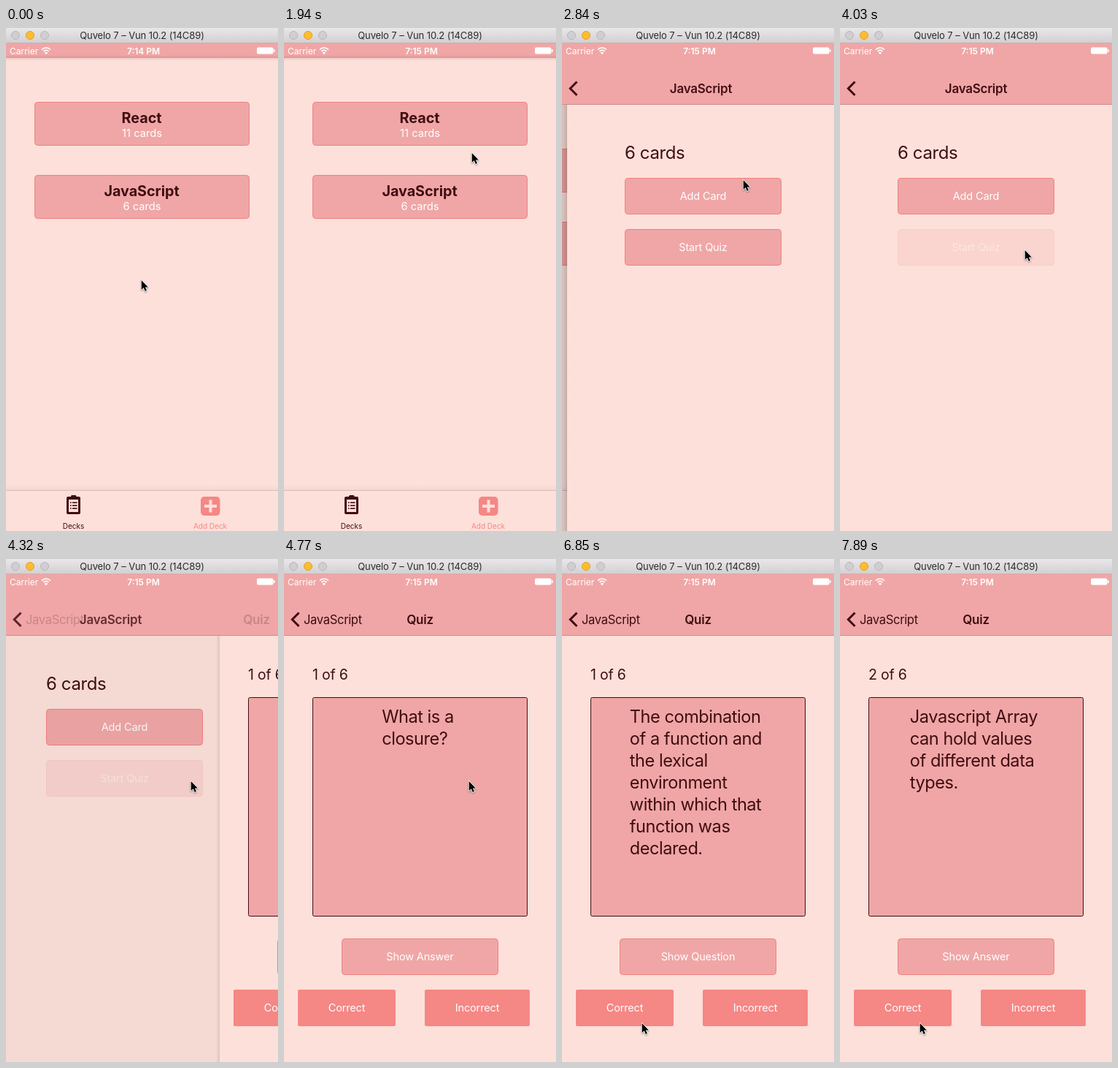
Write an HTML page with a canvas that moves like this. It is 373x688 px and loops after 8000 ms.

```html
<!DOCTYPE html>
<html lang="en">
<head>
<meta charset="utf-8">
<title>Flashcards demo</title>
<style>
  html, body { margin: 0; width: 100%; height: 100%; overflow: hidden; background: #fde0da; }
  canvas { display: block; width: 373px; height: 688px; }
</style>
</head>
<body>
<canvas id="stage"></canvas>
<script>
const W = 373, H = 688, LOOP = 8000, STEP = 148.85;
const HEADER_BOTTOM = 105;
const BG = '#fde0da', ROSE = '#f0a6a6', CORAL = '#f58785', BORDER = '#f08080', DARK = '#3f0d12';

const canvas = document.getElementById('stage');
const ctx = canvas.getContext('2d');
const dpr = window.devicePixelRatio || 1;
canvas.width = W * dpr;
canvas.height = H * dpr;

// Interaction times in ms
const CLOCK_TICK = 590;
const DECK = { press: 2350, release: 2528 };
const START = { press: 3960, release: 4290 };
const SHOW = { press: 5640, release: 5818 };
const FLIP = 5798;
const CORRECT = { press: 7220, release: 7560 };

// Pointer path: time, x, y
const POINTER = [
  [0, 185, 344], [150, 198, 400], [450, 248, 545], [750, 280, 652], [894, 284, 670],
  [1050, 284, 670], [1200, 280, 560], [1350, 262, 350], [1500, 245, 180], [1639, 243, 140],
  [1790, 243, 140], [1937, 257, 170], [2090, 255, 195], [2240, 248, 207], [3290, 248, 207],
  [3590, 251, 245], [3874, 253, 303], [4920, 253, 303], [5070, 230, 392], [5215, 186, 498],
  [5364, 186, 498], [5520, 178, 530], [5670, 176, 548], [6260, 176, 548], [6400, 164, 560],
  [6556, 137, 585], [6705, 116, 622], [6850, 109, 634], [8000, 109, 634]
];

const QUESTION_1 = ['What is a', 'closure?'];
const ANSWER_1 = ['The combination', 'of a function and', 'the lexical', 'environment',
  'within which that', 'function was', 'declared.'];
const QUESTION_2 = ['Javascript Array', 'can hold values', 'of different data', 'types.'];

const clamp = v => Math.max(0, Math.min(1, v));
const lerp = (a, b, p) => a + (b - a) * p;

function pointerAt(t) {
  const i = Math.max(1, POINTER.findIndex(k => k[0] >= t));
  const [t0, x0, y0] = POINTER[i - 1], [t1, x1, y1] = POINTER[i];
  const p = (t - t0) / (t1 - t0);
  return [lerp(x0, x1, p), lerp(y0, y1, p)].map(Math.round);
}

// cubic-bezier(.2833, .99, .31833, .99) over 500 ms
function slideProgress(t, start) {
  const u = clamp((t - start) / 500);
  if (u === 0 || u === 1) return u;
  const bezier = (a, b, s) => 3 * a * s * (1 - s) ** 2 + 3 * b * s * s * (1 - s) + s ** 3;
  let lo = 0, hi = 1;
  for (let i = 0; i < 20; i++) {
    const mid = (lo + hi) / 2;
    if (bezier(0.2833, 0.31833, mid) < u) lo = mid; else hi = mid;
  }
  return bezier(0.99, 0.99, lo);
}

// Overdamped spring
function springProgress(t, start) {
  const s = Math.max(0, t - start) / 1000, slow = 6.62, fast = 18.37;
  return 1 - (fast * Math.exp(-slow * s) - slow * Math.exp(-fast * s)) / (fast - slow);
}

function touchOpacity(t, { press, release }) {
  if (t < press) return 1;
  if (t < release) return 0.2;
  const u = clamp((t - release) / 250);
  return lerp(0.2, 1, u < 0.5 ? 2 * u * u : 1 - 2 * (1 - u) ** 2);
}

function group(draw, { alpha = 1, x = 0, y = 0 } = {}) {
  ctx.save();
  ctx.globalAlpha *= alpha;
  ctx.translate(x, y);
  draw();
  ctx.restore();
}

function rect(x, y, w, h, fill) {
  ctx.fillStyle = fill;
  ctx.fillRect(x, y, w, h);
}

// Lays a flat colour over an area, so that all of it fades as one
function veil(x, y, w, h, color, alpha) {
  group(() => rect(x, y, w, h, color), { alpha });
}

function box(x, y, w, h, radius, fill, border) {
  ctx.beginPath();
  const inset = border ? 0.5 : 0;
  ctx.roundRect(x + inset, y + inset, w - 2 * inset, h - 2 * inset, radius);
  ctx.fillStyle = fill;
  ctx.fill();
  if (!border) return;
  ctx.strokeStyle = border;
  ctx.lineWidth = 1;
  ctx.stroke();
}

function fade(x, y, w, h, from, to, horizontal) {
  const g = horizontal ? ctx.createLinearGradient(x, 0, x + w, 0) : ctx.createLinearGradient(0, y, 0, y + h);
  g.addColorStop(0, from);
  g.addColorStop(1, to);
  rect(x, y, w, h, g);
}

// y is the middle of the capital letters
function text(str, x, y, size, { color = DARK, weight = 400, align = 'center', spacing = 0 } = {}) {
  ctx.font = `${weight} ${size}px Inter, Roboto, sans-serif`;
  ctx.letterSpacing = spacing + 'px';
  ctx.textAlign = align;
  ctx.fillStyle = color;
  ctx.fillText(str, x, y + size * 0.364);
}

function button(label, x, y, w, { alpha = 1, fill = ROSE, border = BORDER, radius = 4 } = {}) {
  box(x, y, w, 50, radius, fill, border);
  text(label, x + w / 2, y + 25, 14.5, { color: '#fff', spacing: -0.15 });
  veil(x, y, w, 50, BG, 1 - alpha);
}

function drawWindowBar() {
  fade(0, 0, W, 20, '#e9e7e9', '#d2d0d2');
  rect(0, 20, W, 1, '#cfaeae');
  [[13, '#d0ced0', '#b9b7b9'], [33, '#fdbd2e', '#e0a028'], [53, '#d0ced0', '#b9b7b9']].forEach(([x, fill, edge]) =>
    box(x - 6, 4, 12, 12, 5.5, fill, edge));
  text('Quvelo 7 – Vun 10.2 (14C89)', 186.5, 10.5, 13, { color: '#2c2b2c', spacing: -0.1 });
}

function drawStatusBar(t) {
  text('Carrier', 5, 31.5, 12, { color: '#fff', align: 'left' });
  text(t < CLOCK_TICK ? '7:14 PM' : '7:15 PM', 188.5, 31.5, 12, { color: '#fff', weight: 600 });
  ctx.strokeStyle = '#fff';
  ctx.lineWidth = 1.6;
  [4.6, 8].forEach(r => {
    ctx.beginPath();
    ctx.arc(55, 35, r, -Math.PI * 0.77, -Math.PI * 0.23);
    ctx.stroke();
  });
  ctx.beginPath();
  ctx.moveTo(55, 36);
  ctx.arc(55, 36, 3, -Math.PI * 0.77, -Math.PI * 0.23);
  ctx.fillStyle = '#fff';
  ctx.fill();
  box(344, 26.5, 22.5, 9, 2, '#fff');
  box(367, 29, 1.7, 4, 0.8, '#fff');
}

function drawTabs() {
  fade(0, 624, W, 8, 'rgba(120,60,60,0)', 'rgba(120,60,60,.05)');
  rect(0, 632, W, 56, BG);
  rect(0, 632, W, 1, '#d3b9b4');

  box(83, 641, 19, 24, 2, DARK);
  box(89, 639, 7.5, 5, 1.5, DARK);
  rect(86, 645, 13, 17, BG);
  for (const y of [649, 653, 657]) {
    rect(88, y - 0.6, 1.6, 1.6, DARK);
    rect(91, y - 0.6, 6.5, 1.6, DARK);
  }
  text('Decks', 92.5, 681, 10);

  box(267, 641, 26.5, 26, 5, CORAL);
  rect(272, 652, 17, 4, BG);
  rect(278.5, 645.5, 4, 17, BG);
  text('Add Deck', 280, 681, 10, { color: CORAL });
}

function drawDeck(name, count, y, alpha = 1) {
  box(39, y, 295, 60, 4, ROSE, BORDER);
  text(name, 186, y + 21.5, 19.8, { weight: 700, spacing: -0.05 });
  text(count, 186.5, y + 42.5, 14.7, { color: '#fff' });
  veil(39, y, 295, 60, BG, 1 - alpha);
}

function drawHome(t, shift) {
  rect(0, 21, W, H - 21, BG);
  drawDeck('React', '11 cards', 101 + shift);
  drawDeck('JavaScript', '6 cards', 201 + shift, touchOpacity(t, DECK));
  drawTabs();
}

function drawDeckScreen(t) {
  rect(0, HEADER_BOTTOM, W, H - HEADER_BOTTOM, BG);
  text('6 cards', 79, 170, 24, { align: 'left', spacing: -0.4 });
  button('Add Card', 79, 205, 215);
  button('Start Quiz', 79, 275, 215, { alpha: touchOpacity(t, START) });
}

// Left-aligned lines in a centred block; wrapped lines keep their trailing space
function drawCardText(lines, scaleX = 1) {
  const size = 23.6, spacing = -0.48;
  ctx.font = `400 ${size}px Inter, Roboto, sans-serif`;
  ctx.letterSpacing = spacing + 'px';
  const width = Math.max(...lines.map(line => ctx.measureText(line + ' ').width));
  group(() => {
    ctx.scale(scaleX, 1);
    lines.forEach((line, i) => text(line, -width / 2, 215.5 + 30 * i, size, { align: 'left', spacing }));
  }, { x: W / 2 });
}

function drawQuizScreen(t) {
  const second = t >= CORRECT.release;
  const flipped = t >= FLIP && !second;
  rect(0, HEADER_BOTTOM, W, H - HEADER_BOTTOM, BG);
  text(second ? '2 of 6' : '1 of 6', 39, 157.5, 19.5, { align: 'left', spacing: -0.2 });
  box(39, 189, 295, 300, 2, ROSE, DARK);

  if (second) {
    drawCardText(QUESTION_2);
  } else {
    const facing = Math.cos(Math.PI * springProgress(t, FLIP));
    drawCardText(facing > 0 ? QUESTION_1 : ANSWER_1, Math.abs(facing));
  }

  button(flipped ? 'Show Question' : 'Show Answer', 79, 519, 215, { alpha: touchOpacity(t, SHOW) });
  const solid = { fill: CORAL, border: null, radius: 2 };
  button('Correct', 19, 589, 134, { ...solid, alpha: touchOpacity(t, CORRECT) });
  button('Incorrect', 193, 589, 144, solid);
}

// Slides a new screen in over a dimming, slower-moving one
function drawPush(p, previous, next) {
  const height = H - HEADER_BOTTOM;
  ctx.save();
  ctx.beginPath();
  ctx.rect(0, HEADER_BOTTOM, W, height);
  ctx.clip();
  if (p < 1) {
    group(previous, { x: Math.round(-0.3 * W * p) });
    veil(0, HEADER_BOTTOM, W, height, '#000', 0.15 * p);
  }
  group(() => {
    if (p < 1) fade(-5, HEADER_BOTTOM, 5, height, 'rgba(0,0,0,0)', 'rgba(0,0,0,.1)', true);
    next();
  }, { x: Math.round(W * (1 - p)) });
  ctx.restore();
}

function drawBack(label, alpha) {
  group(() => {
    ctx.beginPath();
    ctx.moveTo(20.5, 73.5);
    ctx.lineTo(11.3, 82.8);
    ctx.lineTo(20.5, 92);
    ctx.strokeStyle = DARK;
    ctx.lineWidth = 3;
    ctx.stroke();
    text(label, 27, 83, 16.6, { align: 'left', spacing: -0.35 });
  }, { alpha });
}

function drawHeader(deckP, quizP) {
  const title = (str, alpha, offset) => group(
    () => text(str, 186.5, 83, 17, { weight: 600, spacing: -0.25 }), { alpha, x: Math.round(offset) });
  rect(0, 21, W, HEADER_BOTTOM - 21, ROSE);
  rect(0, 104, W, 1, '#c98c8c');
  const deckAlpha = deckP * (1 - quizP);
  drawBack('', deckAlpha);
  title('JavaScript', deckAlpha, 200 * (1 - deckP) - 200 * quizP);
  drawBack('JavaScript', quizP);
  title('Quiz', quizP, 200 * (1 - quizP));
}

function drawPointer(t) {
  const [x, y] = pointerAt(t);
  group(() => {
    const points = [[0, 0], [0, 13], [3, 10.2], [5.2, 15], [7.2, 14.1], [5.2, 9.5], [9.2, 9.5]];
    ctx.beginPath();
    points.forEach(([px, py]) => ctx.lineTo(px, py));
    ctx.closePath();
    ctx.lineJoin = 'round';
    ctx.strokeStyle = '#fff';
    ctx.lineWidth = 1.7;
    ctx.shadowColor = 'rgba(0,0,0,.4)';
    ctx.shadowBlur = 2 * dpr;
    ctx.shadowOffsetY = dpr;
    ctx.stroke();
    ctx.shadowColor = 'transparent';
    ctx.fillStyle = '#000';
    ctx.fill();
  }, { x: x + 0.7, y: y + 1 });
}

function draw(t) {
  ctx.setTransform(dpr, 0, 0, dpr, 0, 0);
  const deckP = slideProgress(t, DECK.release);
  const quizP = slideProgress(t, START.release);

  if (deckP === 0) {
    drawHome(t, 0);
    rect(0, 21, W, 20, ROSE);
    fade(0, 37, W, 4, 'rgba(120,50,50,0)', 'rgba(120,50,50,.14)');
    fade(0, 41, W, 4, 'rgba(120,50,50,.12)', 'rgba(120,50,50,0)');
  } else {
    if (quizP === 0) drawPush(deckP, () => drawHome(t, 64), () => drawDeckScreen(t));
    else drawPush(quizP, () => drawDeckScreen(t), () => drawQuizScreen(t));
    drawHeader(deckP, quizP);
  }
  drawWindowBar();
  drawStatusBar(t);
  drawPointer(t);
}

// The picture advances in even steps, like a low-rate screen recording
const begin = performance.now();
function tick() {
  const t = (performance.now() - begin) % LOOP;
  draw(Math.floor(t / STEP) * 149);
  requestAnimationFrame(tick);
}
tick();
</script>
</body>
</html>
```
